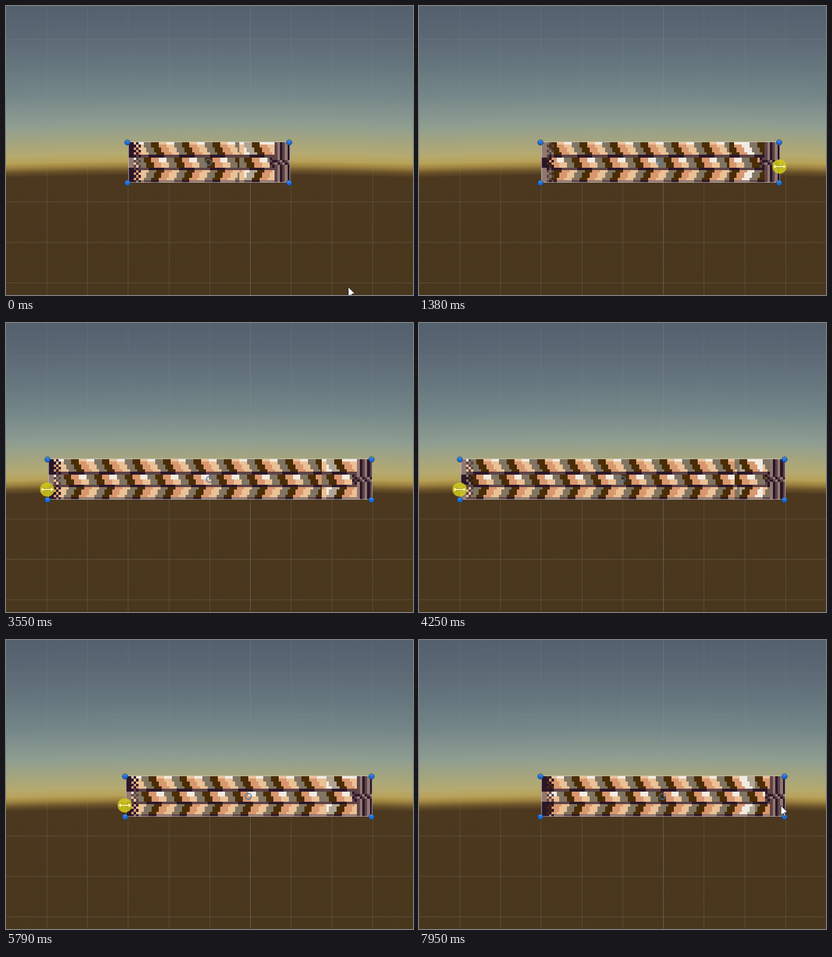
These frames come from a looping animation (682 by 486 pixels, 8 s). An HTML page with a canvas:

```html
<!DOCTYPE html>
<html>
<head>
<meta charset="utf-8">
<style>
html, body { margin: 0; width: 100%; height: 100%; overflow: hidden; background: #49371e; }
canvas { display: block; }
</style>
</head>
<body>
<canvas id="stage" width="682" height="486"></canvas>
<script>
const canvas = document.getElementById('stage');
const ctx = canvas.getContext('2d');
const WIDTH = 682, HEIGHT = 486, LOOP = 8000, TICK = 77.2;
const UNIT = 68.25, PX = UNIT / 16;
const TOP = 229, BOTTOM = 297, CAP = 20;

const DARK = '#4a2d05', SALMON = '#d9976e', PEACH = '#ebc196', GREY = '#807562';
const WHITE = '#f2ebe2', PALE = '#b0a592', PURPLE = '#2b1629', MAUVE = '#917971', PLUM = '#5d4347';

// Mouse path: [time, x, y]
const path = [
  [0, 573, 472], [540, 475, 268], [720, 475, 268], [1380, 604, 270], [1560, 613, 270],
  [2150, 120, 270], [2610, 203, 268], [2780, 203, 268], [3550, 69, 280], [5000, 66, 281],
  [5800, 199, 278], [6710, 202, 273], [7030, 203, 273], [7560, 627, 276], [7790, 606, 278]
];

const mod = (a, n) => ((a % n) + n) % n;
const within = (t, a, b) => t >= a && t < b;
const smooth = u => u * u * (3 - 2 * u);

function mouseAt(t) {
  let i = 1;
  while (i < path.length - 1 && path[i][0] <= t) i++;
  const [t0, x0, y0] = path[i - 1], [t1, x1, y1] = path[i];
  const u = smooth(Math.min(1, (t - t0) / (t1 - t0)));
  return [Math.round(x0 + (x1 - x0) * u), Math.round(y0 + (y1 - y0) * u)];
}

function makeBackdrop() {
  const back = document.createElement('canvas');
  back.width = WIDTH;
  back.height = HEIGHT;
  const b = back.getContext('2d');
  const sky = ['#53616e', '#5b6975', '#66767e', '#758789', '#8f9e91', '#b5aa70'];
  const horizon = ['#b9a257', '#9c823f', '#6b522a', '#4b381f'];
  for (let x = 0; x < WIDTH; x++) {
    const bend = 5 * ((x - WIDTH / 2) / (WIDTH / 2)) ** 2 - 2;
    const g = b.createLinearGradient(0, bend, 0, bend + HEIGHT);
    sky.forEach((color, i) => g.addColorStop(i * 50 / HEIGHT, color));
    horizon.forEach((color, i) => g.addColorStop((262 + i * 8) / HEIGHT, color));
    g.addColorStop(1, '#49371d');
    b.fillStyle = g;
    b.fillRect(x, 0, 1, HEIGHT);
  }

  const fade = b.createLinearGradient(0, 0, 0, HEIGHT);
  fade.addColorStop(0.5, 'rgba(150,155,150,.15)');
  fade.addColorStop(0.7, 'rgba(150,150,140,.25)');
  b.fillStyle = fade;
  const line = i => b.fillRect(Math.floor(i * UNIT), 0, 1, HEIGHT);
  for (let i = 1; i < 10; i++) line(i);
  line(6);
  for (let y = 56; y < HEIGHT; y += UNIT) b.fillRect(0, Math.floor(y), WIDTH, 1);
  return back;
}
const backdrop = makeBackdrop();

const isMid = row => row > 5 && row < 10;

// Column where the dark stripe begins
function lean(row) {
  return isMid(row) ? 6 + ((row - 6) >> 1) : 9 + (Math.min(row, 15 - row) >> 1);
}

// Four stripes, three pixels each, moving one stripe per step
function stripe(col, row, step) {
  const kind = Math.floor(mod(col - lean(row) + 3 * step, 12) / 3);
  if (row === 0) return [DARK, PEACH, WHITE, GREY][kind];
  if (row === 5 || row === 10) return [PURPLE, PLUM, PLUM, PURPLE][kind];
  if (row === 15) return [PURPLE, MAUVE, MAUVE, PLUM][kind];
  if (isMid(row)) return [DARK, SALMON, row < 8 ? WHITE : PEACH, GREY][kind];
  return [DARK, SALMON, PEACH, GREY][kind];
}

function leftEnd(col, row, step) {
  const dim = (mod(step + 1, 4) < 2) !== isMid(row);
  if (col < 2) return dim ? PURPLE : MAUVE;
  if (col < 5 && (col + row) % 2) return dim ? PURPLE : PLUM;
  return stripe(col, row, step);
}

function rightEnd(fromEnd, row, step) {
  const color = stripe(95 - fromEnd, row, step);
  if (fromEnd < 6) return [PURPLE, MAUVE, PLUM][(fromEnd + step + (isMid(row) ? row : 0)) % 3];
  if (fromEnd < 8 && isMid(row)) return (fromEnd + row) % 2 ? PURPLE : PLUM;
  if (fromEnd < 18 && !isMid(row)) {
    if (color === PEACH && fromEnd > 8) return WHITE;
    if (color === GREY && fromEnd > 11) return PALE;
  }
  return color;
}

function drawBelt(left, right, step) {
  const seam = Math.round(right - CAP * PX);
  const column = (x0, x1, colorAt) => {
    for (let row = 0; row < 16; row++) {
      const y = Math.round(TOP + row * PX);
      ctx.fillStyle = colorAt(row);
      ctx.fillRect(x0, y, x1 - x0, Math.round(TOP + (row + 1) * PX) - y);
    }
  };
  for (let i = 0; left + i * PX < seam; i++) {
    const end = Math.min(seam, Math.round(left + (i + 1) * PX));
    column(Math.round(left + i * PX), end, row => leftEnd(i, row, step));
  }
  for (let d = 0; d < CAP; d++) {
    column(Math.round(right - (d + 1) * PX), Math.round(right - d * PX), row => rightEnd(d, row, step));
  }
  ctx.strokeStyle = 'rgba(225,220,220,.6)';
  ctx.lineWidth = 1;
  ctx.strokeRect(left + 0.5, TOP - 0.5, right - left - 1, BOTTOM - TOP);
}

function circle(x, y, r, fill, stroke, width) {
  ctx.beginPath();
  ctx.arc(x, y, r, 0, 2 * Math.PI);
  ctx.fillStyle = fill;
  ctx.fill();
  if (!stroke) return;
  ctx.strokeStyle = stroke;
  ctx.lineWidth = width;
  ctx.stroke();
}

function handle(x, y) {
  const shine = ctx.createLinearGradient(0, y - 4, 0, y + 4);
  shine.addColorStop(0, '#65aaf5');
  shine.addColorStop(0.4, '#2278e8');
  shine.addColorStop(1, '#1563d4');
  circle(x + 0.5, y + 0.5, 4.5, shine, '#243d5e', 1);
}

function polygon(x, y, points, fill, stroke) {
  ctx.beginPath();
  points.forEach(([dx, dy]) => ctx.lineTo(x + dx, y + dy));
  ctx.closePath();
  ctx.lineWidth = 1;
  ctx.fillStyle = fill;
  ctx.strokeStyle = stroke;
  ctx.fill();
  ctx.stroke();
}

const pointer = [[0, 0], [0, 16], [4, 13], [6, 18], [8, 17], [6, 12], [11, 11]];
const head = [[11, 0], [6, -5], [6, -1.5]];
const lower = head.map(([x, y]) => [x, -y]).reverse();
const turn = ([x, y]) => [-x, -y];
const resizer = [...lower, ...head, ...lower.map(turn), ...head.map(turn)];

function drawCursor(x, y, t) {
  const pressed = within(t, 680, 1620) || within(t, 2770, 7015);
  const sizing = within(t, 500, 1620) || within(t, 2450, 7015);
  if (pressed) circle(x, y, 12, 'rgba(208,200,25,.87)');
  if (!sizing) polygon(x + 0.5, y + 0.5, pointer, '#fff', '#222');
  else if (pressed) polygon(x, y, resizer, '#f8f3a0', '#a59d1c');
  else polygon(x, y, resizer, '#fff', '#222');
}

function draw(time) {
  const tick = Math.floor((time % LOOP + 22) / TICK);
  const t = tick * TICK;
  const step = Math.floor(0.96 * tick + 0.8);
  const [x, y] = mouseAt(t);
  const left = within(t, 2780, 7030) ? x : 203;
  const right = t < 720 ? 474 : t < 1560 ? x - 1 : 612;

  ctx.drawImage(backdrop, 0, 0);
  drawBelt(left + 2, right + 2, step);
  circle((left + right) / 2 + 0.5, 263, 5, 'transparent', 'rgba(70,115,170,.8)', 2);
  for (const hy of [TOP, BOTTOM]) {
    handle(left, hy);
    handle(right, hy);
  }
  drawCursor(x, y, t);
}

const start = performance.now();
function frame() {
  draw(performance.now() - start);
  requestAnimationFrame(frame);
}
frame();
</script>
</body>
</html>
```
